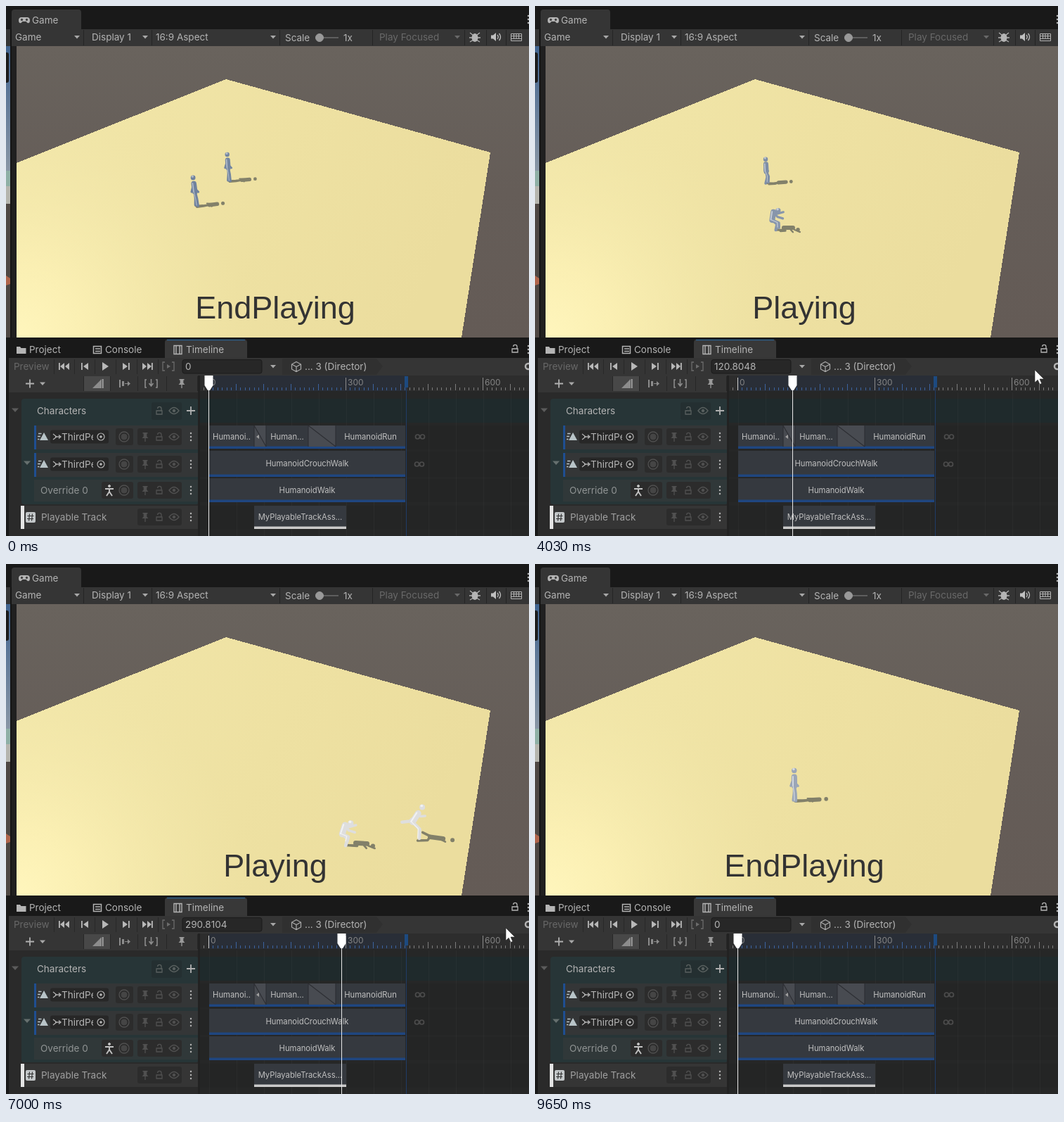
Write an HTML page that moves like this. It is 744 px wide and 753 px high and loops after 9710 ms.

```html
<!DOCTYPE html>
<html lang="en">
<head>
<meta charset="utf-8">
<title>Timeline playback</title>
<style>
  html, body { margin: 0; width: 100%; height: 100%; overflow: hidden; background: #191919; }
  svg { display: block; }
  text { font-family: Inter, sans-serif; font-size: 13.5px; white-space: pre; }
  .clip { font-size: 11.25px; text-anchor: middle; }
  .label { font-family: "Liberation Sans", Arial, sans-serif; font-size: 45px; text-anchor: middle; }
</style>
</head>
<body>
<svg id="stage" width="744" height="753" viewBox="0 0 744 753">
  <defs>
    <linearGradient id="sky" x2="0" y2="1">
      <stop stop-color="#69635d"/><stop offset=".5" stop-color="#655d58"/><stop offset="1" stop-color="#645b56"/>
    </linearGradient>
    <linearGradient id="floor" x2="1" y2=".25">
      <stop stop-color="#f2e7aa"/><stop offset=".6" stop-color="#eee1a2"/><stop offset="1" stop-color="#ebdd9e"/>
    </linearGradient>
    <radialGradient id="glow" gradientUnits="userSpaceOnUse" cx="15" cy="471" r="330">
      <stop stop-color="#fff6bd"/><stop offset=".3" stop-color="#fdf2b6" stop-opacity=".8"/>
      <stop offset="1" stop-color="#f2e7aa" stop-opacity="0"/>
    </radialGradient>
    <linearGradient id="side" x2="0" y2="1">
      <stop stop-color="#41648f"/><stop offset="1" stop-color="#8a97a6"/>
    </linearGradient>
    <clipPath id="view"><path d="M15 57H744V471H15Z"/></clipPath>
    <clipPath id="field"><path d="M63 600H124V665H63Z"/></clipPath>
  </defs>
  <g id="ui"></g>
  <g clip-path="url(#view)">
    <path fill="url(#sky)" d="M15 57H744V471H15Z"/>
    <g shape-rendering="crispEdges">
      <path fill="url(#floor)" d="M15 223L313 104L689 208L648 471H15Z"/>
      <path fill="url(#glow)" d="M15 223L313 104L689 208L648 471H15Z"/>
    </g>
    <g id="runner"></g>
    <g id="croucher"></g>
    <text id="label" class="label" x="383" y="444" fill="#333"></text>
  </g>
  <text id="counter" x="255" y="517" fill="#b4b4b4"></text>
  <g id="head">
    <path d="M0 545V753" stroke="#e8e8e8"/>
    <path fill="#fff" d="M-6 525H6V539L1.5 546H-1.5L-6 539Z"/>
  </g>
  <path id="cursor" fill="#fff" stroke="#222" stroke-width=".6"
        d="M0 0V18L4.2 14.2L7 20.5L9.8 19.3L7 13H13Z"/>
</svg>
<script>
const $ = id => document.getElementById(id);
const LOOP = 9710, START = 1922, STOP = 9426;

// ---- static interface ----
const out = [];
const add = s => out.push(s);
const box = (x, y, w, h, fill, r = 0, more = '') =>
  add(`<rect x="${x}" y="${y}" width="${w}" height="${h}" rx="${r}" fill="${fill}" ${more}/>`);
const txt = (x, y, s, fill = '#b4b4b4', more = '') => add(`<text x="${x}" y="${y}" fill="${fill}" ${more}>${s}</text>`);
const fillPath = (d, c, more = '') => add(`<path d="${d}" fill="${c}" ${more}/>`);
const line = (d, c, w = 1.3, more = '') => add(`<path d="${d}" fill="none" stroke="${c}" stroke-width="${w}" ${more}/>`);
const ring = (x, y, r, c, w = 1.3, fill = 'none') =>
  add(`<circle cx="${x}" cy="${y}" r="${r}" fill="${fill}" stroke="${c}" stroke-width="${w}"/>`);
const arrow = (x, y, c = '#a8a8a8', r = 4) => fillPath(`M${x - r} ${y - r / 2}h${2 * r}l${-r} ${r * 1.1}Z`, c);
const dots = (x, y, c = '#b0b0b0') => [-5, 0, 5].forEach(d => box(x - 1.2, y + d - 1.2, 2.4, 2.4, c, 1));
const plus = (x, y, c = '#b0b0b0') => line(`M${x - 6} ${y}h12M${x} ${y - 6}v12`, c, 1.8);
const lock = (x, y, c) => { line(`M${x - 4} ${y}h8v5h-8Z`, c); line(`M${x + 3} ${y}v-3a2.7 2.7 0 0 0-5.4 0`, c); };
const eye = (x, y, c) => { line(`M${x - 7} ${y}q7-9 14 0q-7 9-14 0Z`, c); ring(x, y, 1.8, c, 1, c); };
const pin = (x, y, c) => { fillPath(`M${x - 3.5} ${y - 6}h7v1.5h-1.2v4l2.2 2.5h-9l2.2-2.5v-4h-1.2Z`, c); line(`M${x} ${y + 2}v5`, c); };

function topPanel() {
  box(0, 0, 744, 753, '#191919');
  box(0, 33, 744, 24, '#353535');
  fillPath('M8 33V9q0-4 4-4h91q4 0 4 4V33Z', '#353535');
  fillPath('M22 16h8q4 0 4 4.5t-3.5 3.5l-2-2h-5l-2 2q-3.5 1-3.5-3.5t4-4.5Z', '#b4b4b4');
  ring(22.5, 19.5, 1.2, '#353535', .8, '#353535');
  ring(29.5, 19.5, 1.2, '#353535', .8, '#353535');
  txt(37, 25, 'Game');
  dots(743, 19);
  [110, 207, 389, 521, 652, 683, 711].forEach(x => box(x, 34, 1, 22, '#242424'));
  txt(13, 49, 'Game'); arrow(101, 44);
  txt(122, 49, 'Display 1'); arrow(198, 44);
  txt(213, 49, '16:9 Aspect'); arrow(380, 44);
  txt(397, 49.5, 'Scale'); txt(480, 49.5, '1x');
  line('M446 45H473', '#5e5e5e', 2);
  ring(446, 45, 5.5, '#999', 1, '#999');
  txt(531, 49, 'Play Focused', '#696969'); arrow(642, 44, '#696969');
  add('<ellipse cx="667" cy="45" rx="4.5" ry="6" fill="#b4b4b4"/>');
  line('M660 38l5 4M674 38l-5 4M659 45h16M660 51l5-3M674 51l-5-3', '#b4b4b4');
  fillPath('M690 41.5h3l4-3.5v12l-4-3.5h-3Z', '#c0c0c0');
  line('M699 41q2.5 3 0 6M701.5 39q4 5 0 10', '#c0c0c0');
  line('M718.5 39.5h15v10h-15ZM719 42.7h14M719 46.4h14M722.5 39v7M726 39v7M729.5 39v7', '#b4b4b4', 1);

  // sliver of the neighbouring scene view
  box(0, 57, 6, 414, '#4f4844');
  box(0, 57, 6, 178, 'url(#side)');
  box(-4, 66, 8, 43, '#1c1c1c', 3);
  box(0, 234, 6, 22, '#8fb0a6');
  box(0, 256, 6, 25, '#b5b5ae');
  fillPath('M0 383l6 4v8l-6 2Z', '#b0654c');
  box(6, 33, 2, 438, '#151515');
  box(8, 57, 7, 414, '#202020');
}

function tabs() {
  box(0, 471, 744, 29, '#191919');
  fillPath('M226 501V478q0-4 4-4h109q4 0 4 4V501Z', '#383838');
  line('M229 474.5H340', '#2c5d87', 1.6);
  fillPath('M15 484h5l1.5 2h7v8h-13.5Z', '#b4b4b4');
  line('M124.5 483.5h11v10h-11ZM127 487h7M127 490.5h7', '#b4b4b4', 1.5);
  line('M239 482.5h11v12h-11ZM242 482v13M247 482v13', '#b4b4b4', 1.4);
  txt(33, 493, 'Project'); txt(141, 493, 'Console'); txt(256, 493, 'Timeline');
  lock(724, 487, '#b4b4b4');
  dots(743, 488);
}

function transport() {
  box(4, 500, 740, 25, '#353535');
  txt(11, 517, 'Preview', '#686868');
  [68, 97, 126, 156, 186, 216].forEach(x => box(x, 502, 1, 21, '#282828'));
  const c = '#b8b8b8';
  fillPath('M83 507v10l-6-5ZM90 507v10l-6-5ZM75 507h1.8v10h-1.8Z', c);
  fillPath('M117 507v10l-7-5ZM107 507h1.8v10h-1.8Z', c);
  fillPath('M137 506v12l9-6Z', c);
  fillPath('M166 507v10l7-5ZM174 507h1.8v10h-1.8Z', c);
  fillPath('M194 507v10l6-5ZM201 507v10l6-5ZM207 507h1.8v10h-1.8Z', c);
  line('M226 506h-3v12h3M236 506h3v12h-3', '#6c6c6c');
  fillPath('M229 509v6l5-3Z', '#6c6c6c');
  box(251, 502.5, 113, 19.5, '#272727', 3, 'stroke="#1b1b1b"');
  arrow(380, 512);
  fillPath('M393 501H527L536 512L527 524H393Z', '#303030');
  line('M413 505.5l6.5 3.5v7l-6.5 3.5l-6.5-3.5v-7ZM406.5 509l6.5 3.5l6.5-3.5M413 512.5v7', '#aaa', 1.2);
  txt(425, 517, '... 3 (Director)');
  ring(743, 512, 4, '#b4b4b4', 2.5);
}

function ruler() {
  box(4, 525, 740, 228, '#262727');
  box(4, 525, 270, 24, '#353535');
  plus(34, 536.5); arrow(52, 536.5);
  box(110, 526, 38, 21, '#484848');
  [110, 148, 187, 228, 272].forEach(x => box(x, 526, 1, 21, '#272727'));
  fillPath('M123 543l13-13v13Z', '#8c8c8c'); box(137, 530, 1.5, 13, '#b0b0b0');
  fillPath('M161 531h2v11h-2ZM165 533h3v7h-3ZM169 536h4v-3l4 3.5l-4 3.5v-3h-4Z', '#8c8c8c');
  line('M200 531h-2v11h2M213 531h2v11h-2M206.5 530v9M203.5 536l3 4l3-4', '#8c8c8c', 1.6);
  pin(250, 536, '#9a9a9a');
  box(276, 525, 468, 22, '#2d2d2d');
  box(289, 525, 281, 22, '#27303e', 0, 'opacity=".6"');
  for (let i = -1; i < 70; i++) {
    const x = 289 + i * 6.5, h = i % 30 === 0 ? 18 : i % 6 === 0 ? 9 : 4;
    const c = i === 0 ? '#d0d0d0' : i % 30 === 0 ? '#8c8c8c' : i > 0 && x < 569 ? '#3b639f' : '#7c7c7c';
    box(Math.floor(x) - 1, 546 - h, 1, h, c);
  }
  ['0', '300', '600'].forEach((s, i) => txt(291 + i * 195, 539, s, '#858585', 'style="font-size:12px"'));
  box(567, 526, 5, 16, '#1d4a80');
}

function trackTools(y, c = '#505050') {
  box(187, y - 12, 63, 24, '#2c2c2c', 3);
  pin(198, y, c); lock(218, y, c); eye(239, y, c);
  dots(263, y);
}

function record(y, x) {
  box(x, y - 12, 181 - x, 24, '#2c2c2c', 3);
  ring(168, y, 7, '#505050'); ring(168, y, 4, '#454545', 1, '#454545');
}

function binding(y) {
  box(40, y - 16, 233, 34, '#343637');
  box(40, y - 16, 3, 34, '#1f4f91');
  fillPath(`M48 ${y + 5}l6-11l6 11Z`, '#b8c4c8');
  line(`M46 ${y - 4.5}h4.5M45 ${y - .5}h4M45 ${y + 3.5}h2.5`, '#b8c4c8', 1.5);
  box(63, y - 9.5, 83, 19, '#272727', 3);
  add('<g clip-path="url(#field)">');
  line(`M67 ${y - 4}l5 4l-5 4M70 ${y}h8M75 ${y - 2.5}l3 2.5l-3 2.5`, '#b0b0b0');
  txt(79, y + 5, 'ThirdPerson');
  add('</g>');
  ring(135, y, 5, '#b4b4b4', 1.2); ring(135, y, 1.3, '#b4b4b4', 1, '#b4b4b4');
  record(y, 156);
  trackTools(y);
}

function trackList() {
  box(4, 549, 270, 204, '#2a2a2a');
  box(22, 558, 252, 150, '#273537', 4);
  arrow(13, 574, '#5c5c5c', 5);
  txt(44, 580, 'Characters');
  box(207, 563, 43, 25, '#242f31', 3);
  lock(218, 575, '#59605f'); eye(239, 575, '#59605f'); plus(263, 575);
  binding(612); binding(651);
  arrow(30, 649, '#66706f', 5);
  box(40, 673, 233, 31, '#303839');
  txt(49, 693, 'Override 0', '#909494');
  record(688, 136);
  ring(147, 682, 1.5, '#c4c4c4', 1, '#c4c4c4');
  line('M141 686h12M147 685v5l-4 6M147 690l4 6', '#c4c4c4', 1.9);
  trackTools(688);
  box(21, 710, 252, 33, '#353535');
  box(21, 710, 5, 33, '#e4e4e4');
  box(28, 719, 14, 15, '#c4c8ca', 2);
  line('M33.5 721.5l-1 10M37.5 721.5l-1 10M30.5 724.5h9M30 728.5h9', '#353535', 1.2);
  txt(50, 731, 'Playable Track', '#a0a0a0');
  trackTools(726);
  box(273, 525, 3, 228, '#222');
}

function clip(x, y, w, h, name, bar = '#1f4680') {
  box(x, y, w, h, '#35393f');
  box(x, y + h - 3.5, w, 3.5, bar);
  txt(x + w / 2, y + h / 2 + 3.5, name, '#c0c0c0', 'class="clip"');
}

function blend(x, w) {
  box(x, 596, w, 30, '#484b51');
  box(x, 626, w, 3, '#1f4680');
  line(`M${x} 596l${w} 30M${x} 596v30M${x + w} 596v30`, '#2d2f34', 1.2);
}

function clips() {
  box(276, 558, 468, 34, '#1f2a2c');
  [[596, 34], [633, 36], [672, 33], [710, 34]].forEach(([y, h]) => box(276, y, 468, h, '#242525'));
  for (let x = 289; x < 744; x += 39) box(x, 549, 1, 204, '#fff', 0, 'opacity=".03"');
  box(569, 542, 1, 211, '#203c66');
  clip(289, 596, 64, 33, 'Humanoi..');
  clip(370, 596, 60, 33, 'Human...');
  clip(469, 596, 99, 33, 'HumanoidRun');
  blend(353, 17); blend(430, 39);
  fillPath('M360 609v6l-4-3Z', '#a0a0a0');
  clip(289, 632, 279, 37, 'HumanoidCrouchWalk');
  clip(289, 671, 279, 34, 'HumanoidWalk');
  clip(353, 710, 131, 33, 'MyPlayableTrackAss...', '#cacaca');
  [[589, 612], [588, 651]].forEach(([x, y]) => [-3.5, 3.5].forEach(d => ring(x + d, y, 3, '#4c4c4c', 1.7)));
}

topPanel(); tabs(); transport(); ruler(); trackList(); clips();
$('ui').innerHTML = out.join('');

// ---- motion ----
const mix = (a, b, k) => a + (b - a) * k;
const clamp = k => Math.max(0, Math.min(1, k));
const ramp = (t, a, b) => clamp((t - a) / (b - a));

// Rows are [time, ...values]; linear between rows.
function track(rows, t) {
  if (t <= rows[0][0]) return rows[0].slice(1);
  const i = rows.findIndex(r => r[0] > t);
  if (i < 0) return rows[rows.length - 1].slice(1);
  const a = rows[i - 1], b = rows[i], k = (t - a[0]) / (b[0] - a[0]);
  return a.slice(1).map((v, n) => mix(v, b[n + 1], k));
}

const COUNT = [[START, 0], [4030, 120.8048], [5240, 189.9904], [6240, 247.1689], [7700, 331.0066], [STOP, 430]];
const RUNNER = [[0, 316, 228], [1630, 318, 228], [3667, 318, 228], [4030, 329, 234], [5240, 369, 253],
  [5710, 388, 262], [6240, 427, 283], [6970, 573, 361], [7700, 749, 438], [8000, 830, 473]];
const CROUCHER = [[0, 268.5, 262], [1630, 270.5, 262], [START, 270.5, 262], [4030, 343, 303], [5240, 393, 331],
  [6240, 441, 358], [7700, 525, 405], [STOP, 634, 467]];
const CURSOR = [[200, 725, 672], [800, 712, 540], [1000, 709, 516], [2050, 709, 516], [2200, 711, 517],
  [8100, 711, 517], [8500, 718, 560], [8900, 716, 760]];

const POSE = {
  idle:   { hip: [0, 2],    neck: [0, -9],    head: [0, -17], foot: [0, 20],  step: 1.5, lift: 0,  knee: .5, hand: [0, 2],  swing: 4.5, drop: 0 },
  walk:   { hip: [0, 1],    neck: [0, -9],    head: [0, -16], foot: [0, 18],  step: 8,   lift: 4,  knee: 2,  hand: [0, 0],  swing: 8,   drop: 0 },
  run:    { hip: [-1, 2],   neck: [3, -8],    head: [6, -15], foot: [-1, 17], step: 14,  lift: 11, knee: 4,  hand: [4, -3], swing: 9,   drop: 2 },
  crouch: { hip: [-5, 1],   neck: [-3, -9],   head: [3, -11], foot: [1, 14],  step: 8,   lift: 5,  knee: 4,  hand: [9, -5], swing: 2,   drop: 4 }
};

// Order: head, neck, hip, then knee, foot, elbow, hand for each side.
function joints(p, phase) {
  const pts = [p.head, p.neck, p.hip];
  for (const side of [1, -1]) {
    const a = Math.sin(phase) * side, c = Math.cos(phase) * side;
    const foot = [p.foot[0] + p.step * a, p.foot[1] + p.step * a * .3 - p.lift * Math.max(0, c - .6 * a)];
    const hand = [p.hand[0] - p.swing * a, p.hand[1] + p.drop * side];
    const mid = (u, v, dx, dy) => [(u[0] + v[0]) / 2 + dx, (u[1] + v[1]) / 2 + dy];
    pts.push(mid(p.hip, foot, p.knee, -p.knee * .3), foot, mid(p.neck, hand, -1, 2), hand);
  }
  return pts;
}

const blendPts = (a, b, k) => a.map((p, i) => p.map((v, n) => mix(v, b[i][n], k)));
const poly = (q, ...ids) => 'M' + ids.map(i => q[i].map(v => v.toFixed(2)).join(' ')).join('L');
const stroke = (d, w, c) => `<path d="${d}" stroke="${c}" stroke-width="${w}"/>`;

function body(q, c, s) {
  return stroke(poly(q, 2, 3, 4) + poly(q, 2, 7, 8), 3.7 * s, c) +
    stroke(poly(q, 1, 5, 6) + poly(q, 1, 9, 10), 2.8 * s, c) +
    stroke(poly(q, 1, 2), 7 * s, c) +
    `<circle cx="${q[0][0]}" cy="${q[0][1]}" r="${3.2 * s}" fill="${c}"/>`;
}

function figure(x, y, pts) {
  const s = 1 + (y - 228) * .0018, lean = (380 - x) * .05 / 42;
  const q = pts.map(([u, v]) => [(u + v * lean) * s, v * s]);
  const ground = Math.max(q[4][1], q[8][1]);
  const cast = q.map(([u, v]) => [.7 * u - 1.05 * (v - ground), ground + .42 * u + .06 * (v - ground)]);
  const k = clamp((x - 310) / 150), light = '#f4f5f6';
  const tone = `rgb(${[112, 130, 157].map(v => Math.round(mix(v, 222, k)))})`;
  return `<g fill="none" stroke-linecap="round" stroke-linejoin="round" transform="translate(${x} ${y})">
    <g opacity=".75">${body(cast, '#5f6158', s * .75)}</g>
    ${body(q, tone, s)}
    <g transform="translate(${-1.7 * s} ${-.6 * s})" opacity="${mix(.5, .9, k)}">
      ${stroke(poly(q, 1, 2), 1.6 * s, light)}${stroke(poly(q, 2, 3, 4), s, light)}
      <circle cx="${q[0][0] + s}" cy="${q[0][1] - s}" r="${1.5 * s}" fill="${light}"/>
    </g></g>`;
}

function render(t) {
  const playing = t >= START && t < STOP;
  const count = playing ? track(COUNT, t)[0] : 0;
  $('counter').textContent = playing ? count.toFixed(4) : '0';
  $('label').textContent = count >= 100 && count < 302 ? 'Playing' : 'EndPlaying';
  $('head').setAttribute('transform', `translate(${Math.floor(288 + count * .65) + .5} 0)`);

  const stride = 2 * Math.PI * (t - 4990) / 1000;
  const idle = joints(POSE.idle, Math.PI / 2);
  const toRun = blendPts(joints(POSE.walk, stride), joints(POSE.run, 2 * Math.PI * (t - 6065) / 700), ramp(t, 5710, 6500));
  $('runner').innerHTML = t < 8000 ? figure(...track(RUNNER, t), blendPts(idle, toRun, ramp(t, 3667, 4100))) : '';
  $('croucher').innerHTML = t >= STOP
    ? figure(369, 313, idle)
    : figure(...track(CROUCHER, t), playing ? joints(POSE.crouch, stride) : idle);

  const [cx, cy] = track(CURSOR, t);
  $('cursor').setAttribute('transform', `translate(${cx} ${cy})`);
  $('cursor').style.display = t < 200 || t > 8900 ? 'none' : '';
}

// Time advances in steps of 10 ms.
const begin = performance.now();
function tick() {
  const t = (performance.now() - begin) % LOOP;
  render(t - t % 10);
  requestAnimationFrame(tick);
}
tick();
</script>
</body>
</html>
```
